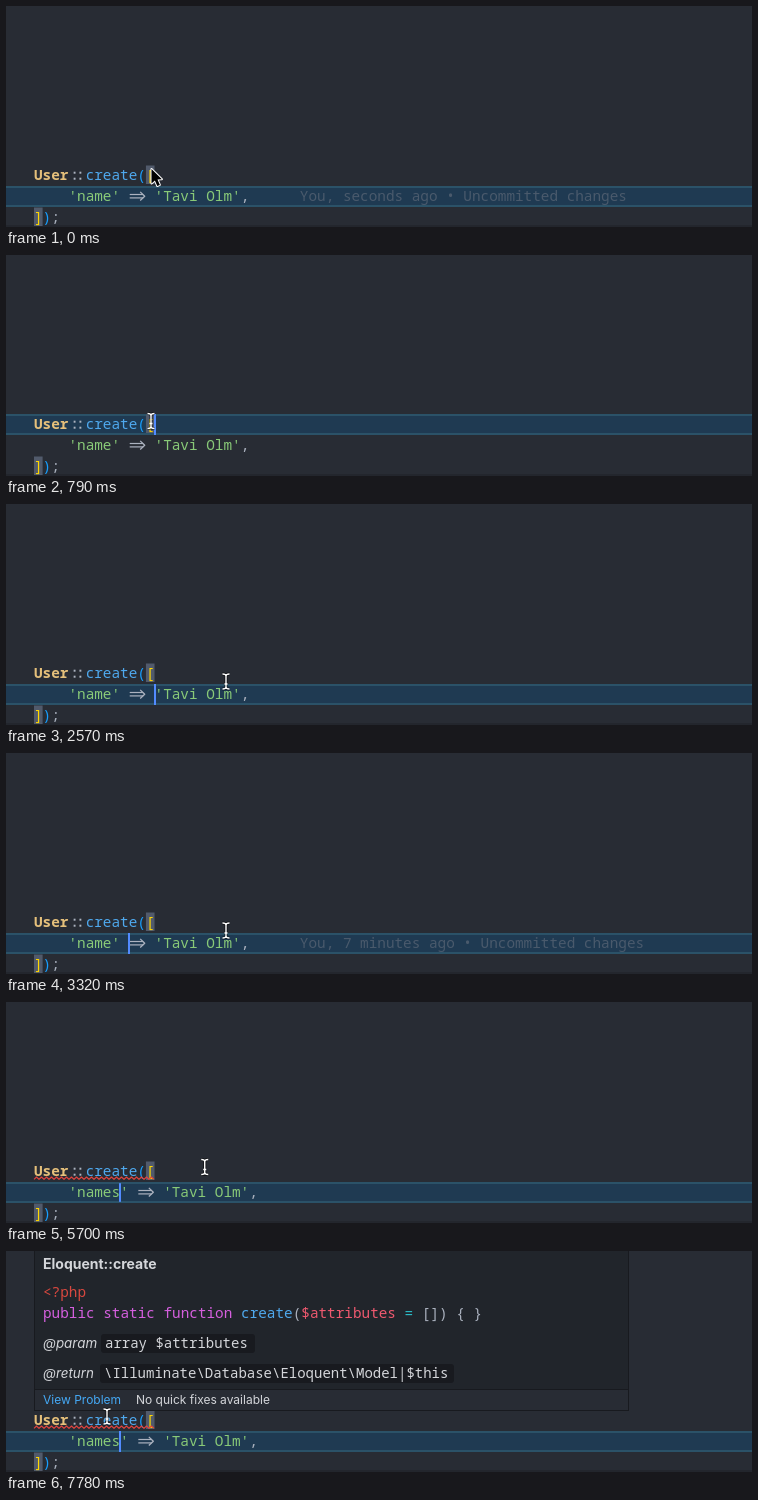
An HTML page with a canvas that plays this animation: 746x221 px, repeating every 8000 ms.

```html
<!DOCTYPE html>
<html lang="en">
<head>
<meta charset="utf-8">
<title>Editor hover</title>
<style>
  html, body { margin: 0; width: 100%; height: 100%; overflow: hidden; background: #282c34; }
  canvas { display: block; }
</style>
</head>
<body>
<canvas id="stage" width="746" height="221"></canvas>
<script>
const ctx = document.getElementById('stage').getContext('2d');
const LOOP = 8000, STEP = 148.5;
const LEFT = 28, TOP = 159, LINE = 21, CELL = 8.61;
const MONO = '"Noto Sans Mono", monospace';
const CODE = `500 14.35px ${MONO}`;
const SANS = 'Inter, sans-serif';
const C = {
  bg: '#282c34', line: '#1f3a52', lineEdge: '#2b5268', match: '#515a6b',
  plain: '#abb2bf', yellow: '#e5c07b', blue: '#4fa9ee', bracket: '#179fff', gold: '#ffd700',
  green: '#89ca78', blame: '#4a5a6c', caret: '#528bff', error: '#e0443e',
  purple: '#d55fde', red: '#ef596f', cyan: '#2bbac5', tag: '#d8483f',
  popup: '#21252b', popupEdge: '#181a1f', status: '#282c34', chip: '#181a1f',
  link: '#45a9f5', light: '#d4d6da'
};

const column = n => LEFT + n * CELL;
const rowTop = row => TOP + row * LINE;
const baseline = row => rowTop(row) + 14.7;

function rect(x, y, w, h, color) {
  ctx.fillStyle = color;
  ctx.fillRect(x, y, w, h);
}

function text(str, x, y, color, font = CODE) {
  ctx.font = font;
  ctx.fillStyle = color;
  ctx.fillText(str, x, y);
}

// Draws [text, color] pairs one after another.
function spans(parts, x, y) {
  for (const [str, color] of parts) {
    text(str, x, y, color);
    x += str.length * CELL;
  }
}

function path(points, close) {
  ctx.beginPath();
  points.forEach(([x, y]) => ctx.lineTo(x, y));
  if (close) ctx.closePath();
}

function stroke(color, width) {
  ctx.strokeStyle = color;
  ctx.lineWidth = width;
  ctx.stroke();
}

function doubleColon(x, y) {
  for (const dx of [5.2, 11]) for (const dy of [-8, -2]) rect(x + dx, y + dy, 1.9, 2, C.plain);
}

function fatArrow(x, y) {
  for (const dy of [-6.2, -2.8]) {
    path([[x + 1, y + dy], [x + 14.5, y + dy]]);
    stroke(C.plain, 1.2);
  }
  path([[x + 11.5, y - 8.8], [x + 16, y - 4.5], [x + 11.5, y - 0.2]]);
  stroke(C.plain, 1.3);
}

function activeLine(row) {
  const y = rowTop(row);
  rect(0, y, 746, LINE, C.line);
  rect(0, y, 746, 2, C.lineEdge);
  rect(0, y + LINE - 2, 746, 2, C.lineEdge);
}

function codeText(key) {
  rect(column(13), rowTop(0) + 0.5, CELL, 18.5, C.match);
  rect(column(0), rowTop(2) + 0.5, CELL, 18.5, C.match);

  text('User', column(0), baseline(0), C.yellow, `600 14.35px ${MONO}`);
  doubleColon(column(4), baseline(0));
  spans([['create', C.blue], ['(', C.bracket], ['[', C.gold]], column(6), baseline(0));

  const after = 4 + key.length;
  text(key, column(4), baseline(1), C.green);
  fatArrow(column(after + 1), baseline(1));
  spans([["'Tavi Olm'", C.green], [',', C.plain]], column(after + 4), baseline(1));

  spans([[']', C.gold], [')', C.bracket], [';', C.plain]], column(0), baseline(2));
}

function blame(age, row, endColumn) {
  text(`You, ${age} ago • Uncommitted changes`, column(endColumn) + 50.6, baseline(row), C.blame);
}

// Solid for half a second after a move, then shrinks and grows.
function caret(col, row, age) {
  let height = 1;
  if (age > 500) {
    const cycle = ((age - 500) / 500) % 2;
    const phase = cycle < 1 ? cycle : 2 - cycle;
    const u = Math.min(1, Math.max(0, (phase - 0.2) / 0.6));
    height = 1 - u * u * (3 - 2 * u);
  }
  rect(Math.round(column(col)) - 1, rowTop(row) + LINE * (1 - height) / 2, 2, LINE * height, C.caret);
}

function squiggle() {
  const points = [];
  for (let i = 0; i <= 48; i++) points.push([28 + i * 2.5, i % 2 ? 175 : 177.4]);
  path(points);
  stroke(C.error, 1.1);
}

function chip(str, x, y, width) {
  ctx.fillStyle = C.chip;
  ctx.beginPath();
  ctx.roundRect(x, y - 14, width, 19, 3);
  ctx.fill();
  text(str, x + 4, y, C.light, `500 14px ${MONO}`);
}

function popup() {
  rect(28, 0, 595, 160, C.popupEdge);
  rect(29, 0, 593, 159, C.popup);
  rect(29, 138, 593, 21, C.status);
  rect(29, 138, 593, 1, C.popupEdge);
  text('Eloquent::create', 37, 18, C.light, `700 14px ${SANS}`);
  text('<?php', 37, 46, C.tag);
  spans([
    ['public static function ', C.purple], ['create', C.blue], ['(', C.plain],
    ['$attributes', C.red], [' = ', C.cyan], ['[]) { }', C.plain]
  ], 37, 67);
  const italic = `italic 13.4px ${SANS}`;
  text('@param', 37, 97, C.light, italic);
  chip('array $attributes', 95, 97, 154);
  text('@return', 37, 127, C.light, italic);
  chip('\\Illuminate\\Database\\Eloquent\\Model|$this', 94, 127, 354);
  text('View Problem', 37, 153, C.link, `12px ${SANS}`);
  text('No quick fixes available', 130, 153, C.light, `12px ${SANS}`);
}

function arrowPointer(x, y) {
  path([[0, 0], [0, 14.5], [3.4, 11.4], [5.8, 17], [8.4, 15.9], [6, 10.5], [10.4, 10.3]]
    .map(([dx, dy]) => [x + dx, y + dy]), true);
  ctx.lineJoin = 'round';
  stroke('#fff', 2);
  ctx.fillStyle = '#000';
  ctx.fill();
}

function beamPointer(x, y) {
  ctx.beginPath();
  for (const s of [-1, 1]) {
    ctx.moveTo(x - 3.5, y + s * 7.5);
    ctx.quadraticCurveTo(x, y + s * 7.5, x, y + s * 5.5);
    ctx.quadraticCurveTo(x, y + s * 7.5, x + 3.5, y + s * 7.5);
  }
  ctx.moveTo(x, y - 6);
  ctx.lineTo(x, y + 6);
  ctx.moveTo(x - 1.5, y + 2.5);
  ctx.lineTo(x + 1.5, y + 2.5);
  stroke('rgba(0,0,0,.65)', 3);
  stroke('#fff', 1.4);
}

function glide(from, bend, to, u) {
  u = u * u * (3 - 2 * u);
  const mix = i => (1 - u) ** 2 * from[i] + 2 * u * (1 - u) * bend[i] + u * u * to[i];
  return [mix(0), mix(1)];
}

const rest = { start: [145, 166], middle: [220, 177.5], end: [101, 165.5] };

function mouse(now) {
  const progress = (begin, end) => Math.min(1, Math.max(0, (now - begin) / (end - begin)));
  if (now < 5500) return glide(rest.start, [185, 168], rest.middle, progress(941, 2130));
  return glide(rest.middle, [150, 131], rest.end, progress(5401, 6590));
}

// Caret stops: time, column, row.
const carets = [
  [650, 14, 0], [2570, 14, 1], [2870, 13, 1], [3170, 12, 1],
  [3320, 11, 1], [3770, 10, 1], [4070, 9, 1], [4360, 10, 1]
];

function draw(time) {
  const now = 500 + Math.floor((time - 486) / STEP) * STEP;
  const since = ms => now >= ms - 20;
  const stop = carets.filter(([ms]) => since(ms)).pop();

  rect(0, 0, 746, 221, C.bg);
  rect(0, 219, 746, 2, '#23262d');
  activeLine(stop ? stop[2] : 1);
  codeText(since(4360) ? "'names'" : "'name'");

  if (!since(650)) blame('seconds', 1, 25);
  else if (since(1090) && !since(2570)) blame('7 minutes', 0, 14);
  else if (since(2870) && !since(4510)) blame('7 minutes', 1, since(4360) ? 26 : 25);

  if (since(5700)) squiggle();
  if (stop) caret(stop[1], stop[2], now - stop[0]);
  if (since(7180)) popup();

  if (since(500)) beamPointer(...mouse(now));
  else arrowPointer(145.5, 163);
}

function tick() {
  draw(performance.now() % LOOP);
  requestAnimationFrame(tick);
}
tick();
</script>
</body>
</html>
```
